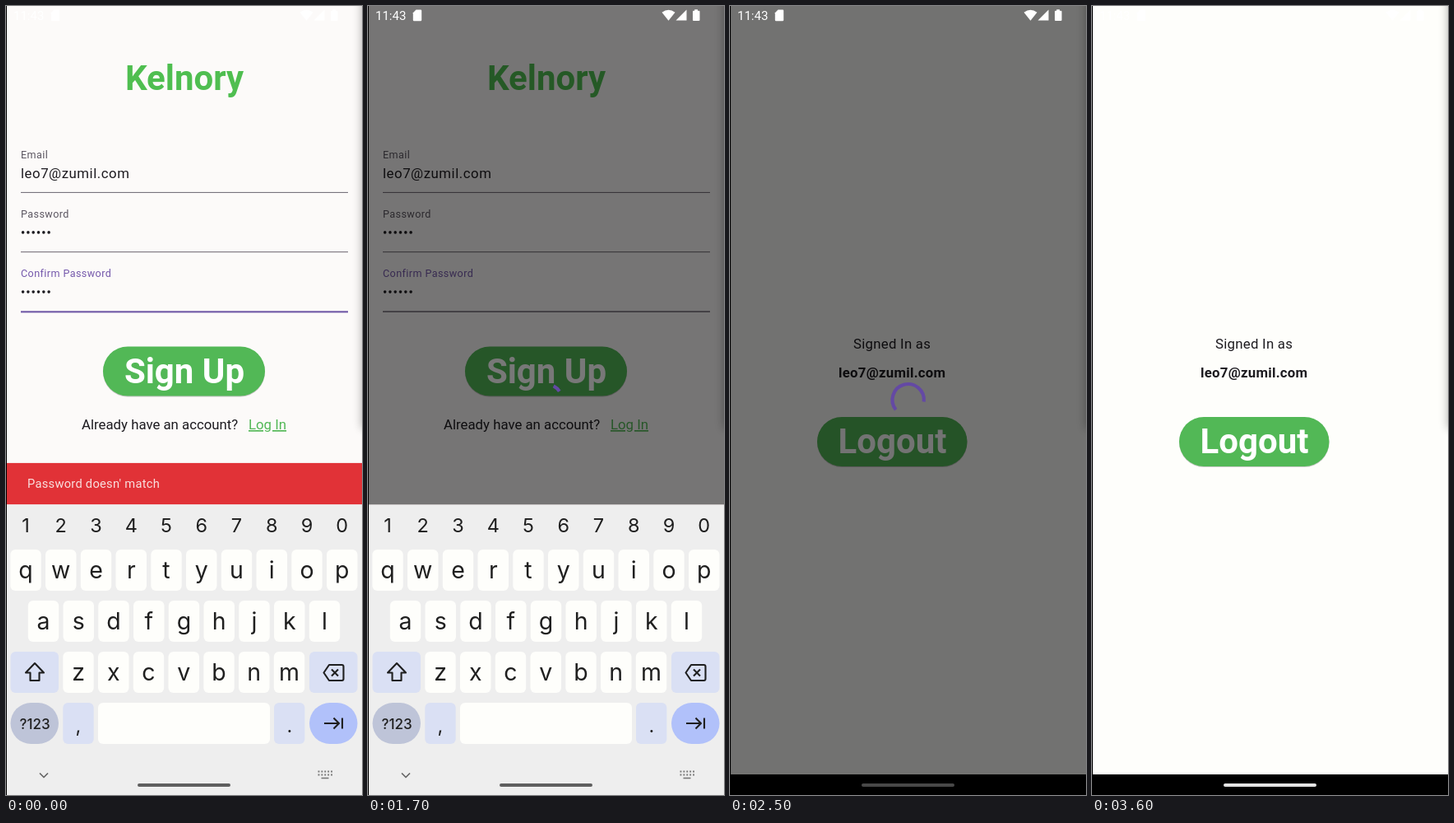
These frames come from a looping animation (433x958 px, 3700 ms). An HTML page:

```html
<!DOCTYPE html>
<html lang="en">
<head>
<meta charset="utf-8">
<title>Sign up flow</title>
<style>
  html, body { margin: 0; width: 100%; height: 100%; overflow: hidden; background: #000; }
  svg { display: block; width: 100%; height: 100%; font-family: Roboto, sans-serif; }
  .big { font-size: 42px; font-weight: 700; text-anchor: middle; }
  .body { font-size: 16.8px; fill: #1d1b20; }
  .link { fill: #52b856; text-decoration: underline; text-decoration-skip-ink: none; }
  .label { font-size: 12.6px; letter-spacing: .4px; fill: #5c5762; }
  .key { font-family: Inter, sans-serif; font-size: 28.5px; text-anchor: middle; fill: #1f1f1f; }
  .digit { font-size: 23.5px; }
  .mode { font-size: 17px; font-weight: 500; }
  .icon { fill: none; stroke: #1f1f1f; stroke-width: 2.1; stroke-linejoin: round; }
</style>
</head>
<body>
<svg viewBox="0 0 433 958" preserveAspectRatio="none">
  <defs>
    <filter id="blur" filterUnits="userSpaceOnUse" x="380" y="-80" width="120" height="660">
      <feGaussianBlur stdDeviation="6"/>
    </filter>
    <clipPath id="snackClip"><rect y="554" width="433" height="52"/></clipPath>
  </defs>
  <rect width="433" height="958"/>

  <g id="form">
    <rect x="1" width="432" height="933" fill="#fcfaf9"/>
    <text class="big" x="217" y="101.5" fill="#4fbe50">Kelnory</text>
    <g id="fields"></g>
    <text class="body" x="18" y="208.5" letter-spacing=".53">leo7@zumil.com</text>
    <rect x="118" y="414.5" width="197" height="60" rx="30" opacity=".22"/>
    <rect x="118" y="413.5" width="197" height="60" rx="30" fill="#52b856"/>
    <text class="big" x="217" y="457.5" fill="#fff">Sign Up</text>
    <text class="body" x="92" y="514">Already have an account?</text>
    <text class="body link" x="295" y="514">Log In</text>
    <g clip-path="url(#snackClip)">
      <g id="snack">
        <rect x="1" y="554.9" width="432" height="50.5" fill="#e13237"/>
        <text x="26" y="585" font-size="14.7" letter-spacing=".26" fill="#f8e0df">Password doesn' match</text>
      </g>
    </g>
  </g>

  <g id="home">
    <rect x="1" width="432" height="933" fill="#fefefb"/>
    <text class="body" x="150" y="416" letter-spacing=".26">Signed In as</text>
    <text class="body" x="132" y="450.5" letter-spacing=".26" font-weight="700">leo7@zumil.com</text>
    <rect x="106" y="500" width="182.5" height="60" rx="30" opacity=".2"/>
    <rect x="106" y="499" width="182.5" height="60" rx="30" fill="#52b856"/>
    <text class="big" x="197.5" y="543" fill="#fff">Logout</text>
  </g>

  <rect id="scrim" x="1" width="432" height="933"/>
  <path id="spinner" fill="none" stroke="#6449a4" stroke-width="4.2"/>

  <g fill="#fff">
    <text x="9" y="17" font-size="15">11:43</text>
    <path d="M58.5 4.5H64a1.2 1.2 0 0 1 1.2 1.2V17a1.2 1.2 0 0 1-1.2 1.2H56A1.2 1.2 0 0 1 54.8 17V8.3Z"/>
    <path d="M357.5 7.8Q365.5 1.5 373.5 7.8L365.5 17.8Z"/>
    <path d="M387.5 4.5V17.5H374.5Z"/>
    <path d="M397.2 4.2H401V5.8H402.5Q403.5 5.8 403.5 6.8V17Q403.5 18 402.5 18H396Q395 18 395 17V6.8Q395 5.8 396 5.8H397.2Z"/>
  </g>

  <g id="board">
    <rect x="1" y="605.3" width="432" height="353" fill="#eee"/>
    <g id="keys"></g>
    <g class="icon">
      <path d="M35 798L46 809.5H40.500V819H29.500V809.500H24Z"/>
      <path d="M393 800H408.500Q410.500 800 410.500 802V817Q410.500 819 408.500 819H393L386.500 809.500ZM396 805.500L404 813.500M404 805.500L396 813.500"/>
      <path d="M387 871H404.500M398.500 864.500L405 871L398.500 877.500M409 864.500V877.500"/>
      <path d="M41 931.500L46 936.500L51 931.500" stroke="#666" stroke-width="1.7"/>
    </g>
    <g stroke="#777" fill="none">
      <path d="M379.500 929.500H397M379.500 933.500H397" stroke-width="1.8" stroke-dasharray="1.9 2"/>
      <path d="M383.500 937.500H392.500" stroke-width="1.6"/>
    </g>
  </g>

  <rect id="pill" x="160" y="944" width="113" height="4" rx="2"/>
  <rect x="433" y="-60" width="40" height="573" opacity=".32" filter="url(#blur)"/>
  <rect width="1" height="958"/>
</svg>
<script>
const LOOP = 3700, TICK = 100;
const $ = id => document.getElementById(id);

// Linear interpolation through [time, value] stops.
function track(stops, t) {
  if (t <= stops[0][0]) return stops[0][1];
  for (let i = 1; i < stops.length; i++) {
    const [a, u] = stops[i - 1], [b, v] = stops[i];
    if (t <= b) return u + (v - u) * (t - a) / (b - a);
  }
  return stops[stops.length - 1][1];
}

// cubic-bezier(.4, 0, .2, 1)
function ease(x) {
  if (x <= 0) return 0;
  if (x >= 1) return 1;
  let lo = 0, hi = 1, s = .5;
  for (let i = 0; i < 24; i++) {
    s = (lo + hi) / 2;
    const r = 1 - s;
    if (1.2 * r * r * s + .6 * r * s * s + s * s * s < x) lo = s; else hi = s;
  }
  return 3 * (1 - s) * s * s + s * s * s;
}

function buildFields() {
  $('fields').innerHTML = ['Email', 'Password', 'Confirm Password'].map((name, i) => {
    const y = 72.2 * i;
    let out = `<text class="label" x="18" y="${185 + y}">${name}</text>` +
      `<rect x="18" y="${225.9 + y}" width="398" height="1.1" fill="#77727c"/>`;
    for (let k = 0; i && k < 6; k++)
      out += `<circle cx="${20.6 + 6.3 * k}" cy="${202.7 + y}" r="1.8" fill="#1d1b20"/>`;
    return out;
  }).join('');
}

function buildKeys() {
  const pitch = 42.75, white = '#fefefb', blue = '#dae0f4';
  const cap = (x, y, w, fill, r = 6) =>
    `<rect x="${x}" y="${y}" width="${w}" height="50" rx="${r}" fill="${fill}"/>`;
  const glyph = (x, y, c, cls = '') => `<text class="key ${cls}" x="${x}" y="${y}">${c}</text>`;
  let out = [...'1234567890'].map((c, i) => glyph(24 + pitch * i, 638.5, c, 'digit')).join('');
  [['qwertyuiop', 24], ['asdfghjkl', 45.5], ['zxcvbnm', 88]].forEach(([row, x0], r) => {
    [...row].forEach((c, i) => {
      const x = x0 + pitch * i, y = 660 + 62 * r;
      out += cap(x - 18.7, y, 37.4, white) + glyph(x, y + 34.5, c);
    });
  });
  out += cap(5.5, 784, 58.5, blue) + cap(369, 784, 58.5, blue) +
    cap(5.5, 846, 58.5, '#bec4d8', 25) + cap(69.3, 846, 37.4, blue) +
    cap(112, 846, 209, white) + cap(326, 846, 37.4, blue) +
    cap(369, 846, 58.5, '#b1c1fa', 25) +
    glyph(88, 882, ',', 'digit') + glyph(345, 882, '.', 'digit') +
    glyph(35, 878, '?123', 'mode');
  $('keys').innerHTML = out;
}

function drawSpinner(ms) {
  const p = ms / 1333 % 1;
  const head = 270 * ease(p * 2), tail = 270 * ease(p * 2 - 1);
  const from = -90 + tail + 90 * p + 360 * ms / 2222;
  const sweep = Math.max(head - tail, .1);
  const at = deg => {
    const a = deg * Math.PI / 180;
    return (216.7 + 19.2 * Math.cos(a)).toFixed(2) + ' ' + (478.3 + 19.2 * Math.sin(a)).toFixed(2);
  };
  $('spinner').setAttribute('d',
    `M${at(from)}A19.2 19.2 0 ${sweep > 180 ? 1 : 0} 1 ${at(from + sweep)}`);
}

function render(time) {
  const t = Math.floor(time % LOOP / TICK) * TICK;
  const signedIn = t >= 2500;
  const show = (id, on) => $(id).setAttribute('display', on ? 'inline' : 'none');
  const drop = (id, y) => $(id).setAttribute('transform', `translate(0 ${y.toFixed(2)})`);

  show('form', !signedIn);
  show('home', signedIn);
  drop('snack', track([[1300, 0], [1400, 8], [1500, 30], [1600, 51]], t));
  drop('board', track([[1700, 0], [1800, 130], [1900, 287], [2000, 353]], t));
  show('board', t < 2000);

  label.style.fill = t < 1800 ? '#7558ab' : '#5c5762';
  line.setAttribute('fill', t < 1700 ? '#6f57a6' : '#77727c');
  line.setAttribute('height', track([[1600, 2.1], [1800, 1.1]], t));

  const scrim = track([[1500, 0], [1600, .27], [1700, .53], [1800, .55], [2500, .55], [2600, .22], [2700, 0]], t);
  $('scrim').setAttribute('opacity', scrim);
  show('spinner', t >= 1600 && t < 2700);
  $('spinner').setAttribute('opacity', track([[1600, .5], [1700, 1], [2500, 1], [2600, .4]], t));
  drawSpinner(track([[1600, 40], [1700, 122], [1900, 255], [2500, 812], [2700, 1010]], t));

  const g = Math.round(t < 2000 ? 95 :
    track([[2500, 72], [2700, 120], [3000, 200], [3400, 228]], t));
  $('pill').setAttribute('fill', `rgb(${g},${g},${g})`);
}

buildFields();
buildKeys();
const label = document.querySelectorAll('.label')[2];
const line = document.querySelectorAll('#fields rect')[2];
const start = performance.now();
function loop() {
  render(performance.now() - start);
  requestAnimationFrame(loop);
}
loop();
</script>
</body>
</html>
```
